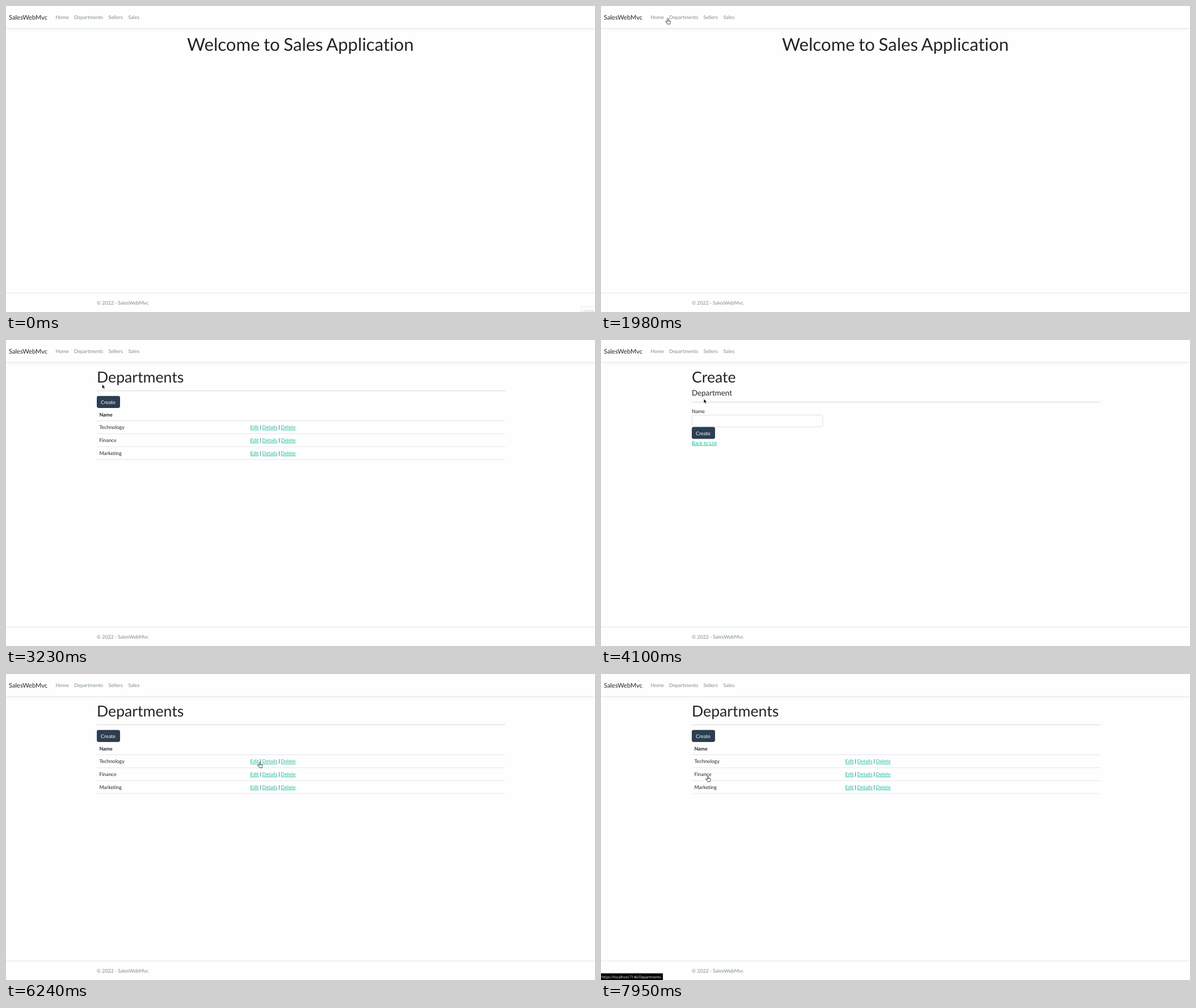
Recreate the animation shown at these times as an HTML page. Size 1038x540 px, loop 8 s.

```html
<!DOCTYPE html>
<html lang="en">
<head>
<meta charset="utf-8">
<title>SalesWebMvc</title>
<style>
  html, body { margin: 0; width: 100%; height: 100%; overflow: hidden; background: #fefefe; }
  header {
    position: absolute; top: 0; left: 0; width: 100%; height: 39px;
    border-bottom: 1px solid #e6e8ea; box-shadow: 0 2.2px 6.7px rgba(0, 0, 0, .05);
  }
  svg { position: absolute; top: 0; left: 0; width: 1038px; height: 540px; }
  text {
    font: 8.89px Lato, sans-serif; fill: #212529; white-space: pre;
    text-rendering: geometricPrecision; font-variant-ligatures: none; word-spacing: -.045em;
  }
  .brand { font-size: 11.11px; }
  .muted text, text.muted { fill: #7f8c8d; }
  .display { font-size: 31.11px; }
  .h1 { font-size: 26.67px; }
  .h4 { font-size: 13.33px; }
  .bold { font-weight: 700; }
  .link { fill: #18bc9c; text-decoration: underline; }
  .button rect { fill: #2c3e50; }
  .button text { fill: #fff; }
  .field { fill: #fff; stroke: #d3d8dc; stroke-width: .8; }
  .rule { fill: #d3d5d6; }
  .line { fill: #e2e5e7; }
  .status text, .tip text { font: 6.27px "Open Sans", sans-serif; }
  .status text { fill: #fff; }
  .tip text { fill: #c8c8c8; font-style: italic; }
  .tip rect { fill: #fefefe; stroke: #e6e6e6; stroke-width: .8; }
</style>
</head>
<body>
<header></header>
<svg viewBox="0 0 1038 540">
  <defs>
    <g id="create-button" class="button">
      <rect x="160" width="41" height="21.1" rx="3.3"/>
      <text x="167" y="14">Create</text>
    </g>
    <g id="form">
      <text class="h4" x="160" y="97.9">Department</text>
      <rect class="rule" x="160" y="109.2" width="720" height="1"/>
      <text x="160" y="129.1">Name</text>
      <rect class="field" x="160.3" y="132.6" width="230.6" height="20.6" rx="3.3"/>
      <text class="link" x="160" y="184.8">Back to List</text>
    </g>
  </defs>

  <text class="brand" x="5" y="23.8">SalesWebMvc</text>
  <g class="muted">
    <text x="87.4" y="22.5">Home</text>
    <text x="120" y="22.5">Departments</text>
    <text x="180.4" y="22.5">Sellers</text>
    <text x="215.5" y="22.5">Sales</text>
  </g>

  <g data-page="home">
    <text class="display" x="319" y="79">Welcome to Sales Application</text>
  </g>

  <g data-page="list">
    <text class="h1" x="160" y="74.5">Departments</text>
    <rect class="rule" x="160" y="89.2" width="720" height="1"/>
    <use href="#create-button" y="98.8"/>
    <text class="bold" x="164.4" y="134.6">Name</text>
    <rect class="line" x="160" y="142" width="720" height="1"/>
    <g id="rows"></g>
  </g>

  <g data-page="create">
    <text class="h1" x="160" y="74.5">Create</text>
    <use href="#form"/>
    <use href="#create-button" y="153.5"/>
  </g>

  <g data-page="edit">
    <text class="h1" x="160" y="74.5">Edit</text>
    <use href="#form"/>
    <text x="167.2" y="146.4">Technology</text>
    <g class="button">
      <rect x="160" y="153.5" width="32.2" height="21.1" rx="3.3"/>
      <text x="167" y="167.5">Save</text>
    </g>
  </g>

  <rect class="line" y="506" width="1038" height="1"/>
  <text class="muted" x="160" y="526.7">© 2022 - SalesWebMvc</text>

  <g class="tip" id="tip">
    <rect x="1014.5" y="530.5" width="30" height="15"/>
    <text x="1017.5" y="540">Gravar</text>
  </g>

  <g class="status" id="status">
    <rect x="-1" y="528.3" height="13" rx="1.2" stroke="#55595c" stroke-width=".5"/>
    <text x="1" y="536.7"></text>
  </g>

  <g id="cursor">
    <path id="arrow" d="M0 0V7.2L1.7 5.7L2.9 8.4L4.1 7.9L2.9 5.2H5.1Z" fill="#000" stroke="#fff" stroke-width=".4"/>
    <path id="hand" d="M-1 1Q0 -.5 1 1V4.2L4 5Q5 5.4 4.8 6.6L4 9V10.6H-1V9.3L-4 6.6Q-4.3 5.2 -2.8 5.6L-1 7Z M1 4.2V6 M2.5 4.7V6.2"
      fill="#fff" stroke="#222" stroke-width=".8" stroke-linejoin="round"/>
  </g>
</svg>
<script>
  const LOOP = 8000, STEP = 68, URL_BASE = "https://localhost:7146/Departments";
  const byId = id => document.getElementById(id);

  byId("rows").innerHTML = ["Technology", "Finance", "Marketing"].map((name, i) => {
    const y = 157.4 + i * 22.78;
    const links = ["Edit", "Details", "Delete"].map(s => `<tspan class="link">${s}</tspan>`).join(" | ");
    return `<text x="164.4" y="${y}">${name}</text><text x="430.3" y="${y}">${links}</text>
      <rect class="line" x="160" y="${y + 7.5}" width="720" height="1"/>`;
  }).join("");

  const pages = [[0, "home"], [2770, "list"], [3640, "create"], [5180, "list"], [6580, "edit"], [7680, "list"]];

  // Status bar: start time, path suffix (null hides it), bar width
  const statuses = [
    [0, null], [2430, "", 109], [3040, null], [3360, "/Create", 131], [3770, null],
    [4960, "", 109], [5320, null], [6300, "/Edit/1", 128], [6850, null], [7460, "", 109]
  ];

  // Pointer: time, x, y, shape
  const path = [
    [220, 970, 494, "arrow"], [346, 241, 163, "arrow"], [410, 276, 168, "arrow"],
    [610, 274, 164, "arrow"], [820, 150, 80, "arrow"], [1000, 44, 14, "arrow"],
    [1120, 52.7, 6.8, "arrow"], [1290, 74, 9, "arrow"], [1360, 87, 13, "hand"],
    [1430, 88, 14, "hand"], [1640, 96, 18, "hand"], [1850, 97, 19, "hand"],
    [2180, 141, 24, "hand"], [2370, 143, 18, "hand"], [2610, 142, 21.5, "hand"],
    [2970, 143, 24, "hand"], [3040, 150, 38, "arrow"], [3360, 183, 106, "hand"],
    [3770, 183, 107, "hand"], [4030, 183, 107, "hand"], [4080, 181.2, 104, "arrow"],
    [4150, 181.2, 104, "arrow"], [4330, 242, 130, "arrow"], [4520, 215, 168, "arrow"],
    [4680, 164, 179, "hand"], [4830, 190, 180, "hand"], [4960, 192, 178, "hand"],
    [5180, 192, 178, "hand"], [5360, 240, 172, "arrow"], [5780, 430, 160, "arrow"],
    [5970, 446, 156, "hand"], [6240, 447.5, 154.8, "hand"], [6380, 438, 154, "hand"],
    [6780, 438, 154, "arrow"], [6930, 300, 84, "arrow"], [7030, 151.6, 131.6, "arrow"],
    [7100, 151.6, 131.6, "arrow"], [7270, 154, 168, "arrow"], [7390, 181, 180, "hand"],
    [7530, 188.5, 179.3, "hand"], [LOOP, 188.5, 179.3, "hand"]
  ];

  const current = (list, t) => list.findLast(entry => entry[0] <= t);
  const show = (el, on) => el.style.display = on ? "" : "none";

  function drawPointer(t) {
    const from = current(path, t);
    show(byId("cursor"), from);
    if (!from) return;
    const to = path[path.indexOf(from) + 1] || from;
    const k = to === from ? 0 : (t - from[0]) / (to[0] - from[0]);
    const at = i => from[i] + (to[i] - from[i]) * k;
    byId("cursor").setAttribute("transform", `translate(${at(1)} ${at(2)})`);
    for (const shape of ["arrow", "hand"]) show(byId(shape), shape === from[3]);
  }

  function drawStatus(t) {
    const [, suffix, width] = current(statuses, t);
    const bar = byId("status");
    show(bar, suffix !== null);
    if (suffix === null) return;
    bar.querySelector("rect").setAttribute("width", width + 1);
    bar.querySelector("text").textContent = URL_BASE + suffix;
  }

  function draw(now) {
    const t = now % LOOP;
    const page = current(pages, t)[1];
    document.querySelectorAll("[data-page]").forEach(el => show(el, el.dataset.page === page));
    show(byId("tip"), t < 70);
    drawStatus(t);
    drawPointer(Math.floor(t / STEP) * STEP + STEP / 2);
  }

  const start = performance.now();
  function tick() {
    draw(performance.now() - start);
    requestAnimationFrame(tick);
  }
  tick();
</script>
</body>
</html>
```
